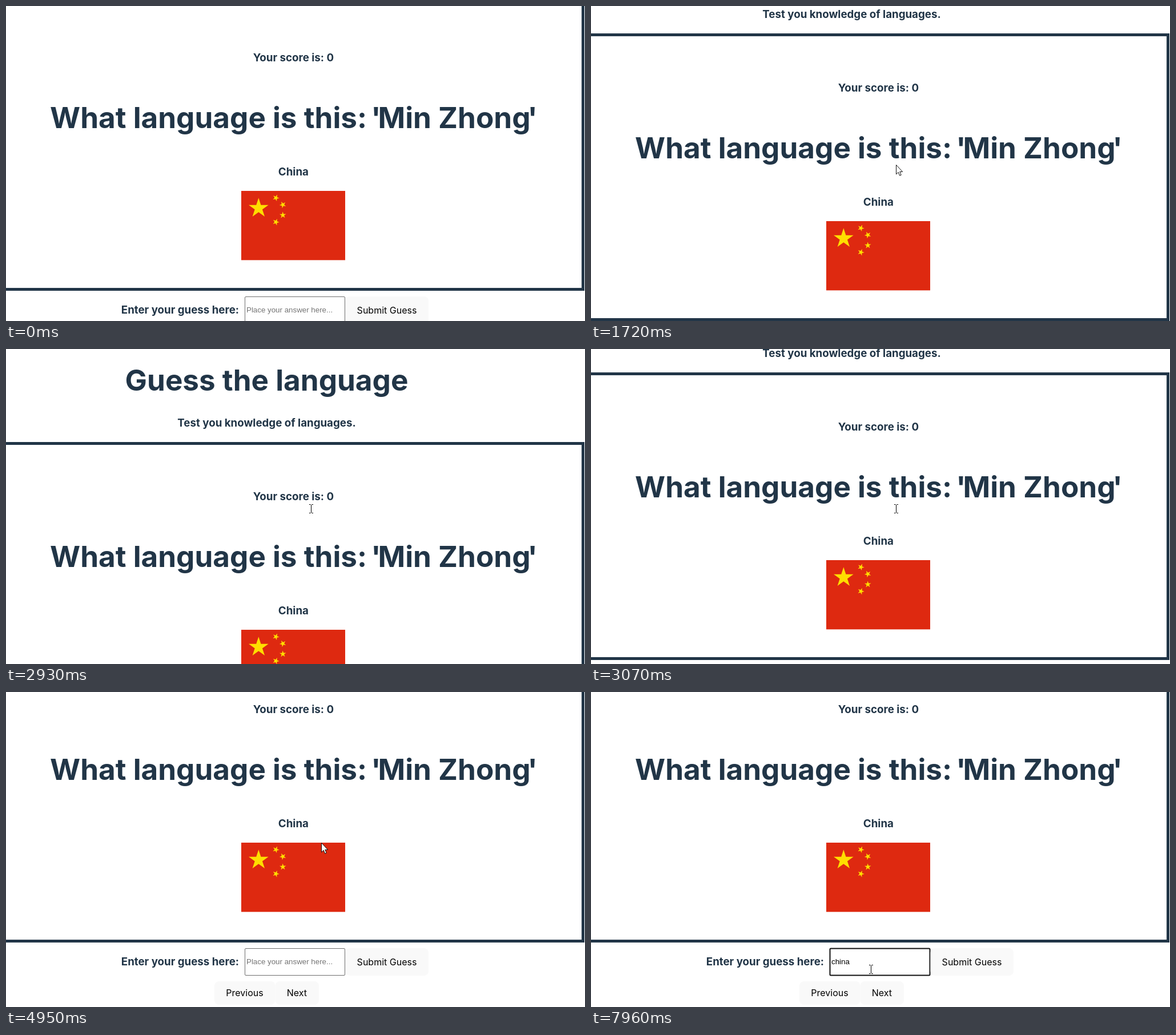
An HTML page for the animation above (8 s loop, 1014 px wide and 552 px high).

```html
<!DOCTYPE html>
<html lang="en">
<head>
<meta charset="utf-8">
<title>Guess the language</title>
<style>
  html, body { margin: 0; width: 100%; height: 100%; overflow: hidden; background: #fff; }
  svg { display: block; }
  text { font-family: Inter, "Open Sans", sans-serif; font-optical-sizing: none; }
  .h1, .h3 { font-weight: 700; fill: #213547; }
  .h1 { font-size: 51.2px; }
  .h3 { font-size: 18.72px; }
  .mid { text-anchor: middle; }
  .button { fill: #f9f9f9; }
  .caption { font-size: 16px; fill: #000; text-anchor: middle; }
  .field { font-family: Arial, "Liberation Sans", sans-serif; font-size: 13.333px; }
  #beam { mix-blend-mode: difference; }
</style>
</head>
<body>
<svg width="1014" height="552" viewBox="0 0 1014 552">
  <rect width="1014" height="552" fill="#fff"/>
  <g id="page">
    <text class="h1 mid" x="456.5" y="-95.4">Guess the language</text>
    <text class="h3 mid" x="456.5" y="-32">Test you knowledge of languages.</text>

    <path d="M-10 -2.5H1010.5V496.5H-10" fill="none" stroke="#213547" stroke-width="5"/>
    <text class="h3 mid" x="503.4" y="96.7">Your score is: 0</text>
    <!-- The straight quotes are kerned tightly against the name. -->
    <text class="h1 mid" x="504" y="214.4">What language is this: <tspan dx="-5">'</tspan><tspan dx="-5">Min Zhong</tspan><tspan dx="-5">'</tspan></text>
    <text class="h3 mid" x="503.4" y="297">China</text>
    <g transform="translate(412 324)">
      <rect width="182" height="121.33" fill="#de2910"/>
      <g id="stars" fill="#ffde00" transform="scale(6.0667)"></g>
    </g>

    <text class="h3" x="201.8" y="539">Enter your guess here:</text>
    <rect id="input" x="418.5" y="509.5" width="175" height="47" rx="1.5" fill="#fff"/>
    <text id="value" class="field" x="421" y="537"></text>
    <rect id="caret" y="525" width="1" height="15" fill="#000"/>
    <rect class="button" x="594.5" y="509" width="145.5" height="48" rx="8"/>
    <text class="caption" x="667" y="539">Submit Guess</text>
    <rect class="button" x="365" y="567" width="106.5" height="41" rx="8"/>
    <text class="caption" x="418" y="593">Previous</text>
    <rect class="button" x="471.5" y="567" width="76.5" height="41" rx="8"/>
    <text class="caption" x="509.3" y="593">Next</text>
  </g>
  <path id="arrow" d="M.5 .5V16.8L4.2 13.3L6.7 19.2L9.2 18.1L6.8 12.4H11.6Z" fill="#fff" stroke="#111" stroke-width="1"/>
  <path id="beam" d="M-4 -7.5H-1.5M.5 -7.5H3M-4 7.5H-1.5M.5 7.5H3M-.5 -7V7" fill="none" stroke="#fff" stroke-width="1"/>
</svg>
<script>
  const LOOP = 8000, TICK = 70;
  const $ = id => document.getElementById(id);
  const page = $('page'), input = $('input'), value = $('value'), caret = $('caret');
  const pointers = { arrow: $('arrow'), beam: $('beam') };

  // Five-pointed star with one tip towards the given angle.
  function star(cx, cy, r, angle) {
    const points = Array.from({ length: 10 }, (_, i) => {
      const a = angle + i * Math.PI / 5, d = i % 2 ? r * 0.382 : r;
      return [cx + d * Math.cos(a), cy + d * Math.sin(a)].map(n => n.toFixed(3)).join();
    });
    return `<polygon points="${points.join(' ')}"/>`;
  }
  const small = [[10, 2], [12, 4], [12, 7], [10, 9]];
  $('stars').innerHTML = star(5, 5, 3, -Math.PI / 2) +
    small.map(([x, y]) => star(x, y, 1, Math.atan2(5 - y, 5 - x))).join('');

  // Every table holds steps that begin with their start time.
  const scroll = [
    [0, 0], [1650, 9], [1720, 53], [1790, 135], [1860, 183.4],
    [2930, 168], [3000, 112], [3070, 46], [3140, -26], [3210, -59], [3280, -60]
  ];

  const entrance = Array.from({ length: 12 }, (_, i) => {
    const left = (1 - i / 11) ** 2;
    return [190 + i * TICK, 'arrow', Math.round(522 + 420 * left), Math.round(266 + 243 * left)];
  });
  const pointer = [
    [0, null, 0, 0],
    ...entrance,
    [1030, 'arrow', 540, 280], [1100, 'arrow', 534, 278],
    [2270, 'beam', 535, 280],
    [3740, 'arrow', 537, 274], [3810, 'arrow', 543, 262], [3880, 'arrow', 549, 249],
    [3950, 'arrow', 553, 240], [4020, 'arrow', 554, 237],
    [4950, 'arrow', 552, 264], [5020, 'arrow', 545, 292], [5090, 'arrow', 530, 350],
    [5160, 'arrow', 512, 422], [5230, 'beam', 501, 468], [5300, 'beam', 497, 484],
    [5370, 'beam', 496, 489], [5770, 'beam', 491, 486]
  ];

  const FOCUS = 5370;
  const typing = [[0, ''], [6430, 'c'], [6690, 'ch'], [6760, 'chi'], [6960, 'chin'], [7430, 'china']];
  const blink = [[0, false], [FOCUS, true], [5900, false], [6430, true], [7960, false]];

  const at = (steps, t) => steps.findLast(step => step[0] <= t);

  function draw(t) {
    page.setAttribute('transform', `translate(0 ${at(scroll, t)[1]})`);

    const [, kind, x, y] = at(pointer, t);
    for (const name in pointers) {
      pointers[name].style.display = name === kind ? '' : 'none';
      pointers[name].setAttribute('transform', `translate(${x} ${y})`);
    }

    const focused = t >= FOCUS, typed = at(typing, t)[1];
    input.setAttribute('stroke', focused ? '#101010' : '#6e6e6e');
    input.setAttribute('stroke-width', focused ? 2 : 1);
    value.textContent = typed || 'Place your answer here...';
    value.setAttribute('fill', typed ? '#000' : '#757575');
    caret.style.display = at(blink, t)[1] ? '' : 'none';
    caret.setAttribute('x', typed ? Math.round(421 + value.getComputedTextLength()) : 422);
  }

  const start = performance.now();
  function frame() {
    draw((performance.now() - start) % LOOP);
    requestAnimationFrame(frame);
  }
  frame();
</script>
</body>
</html>
```
